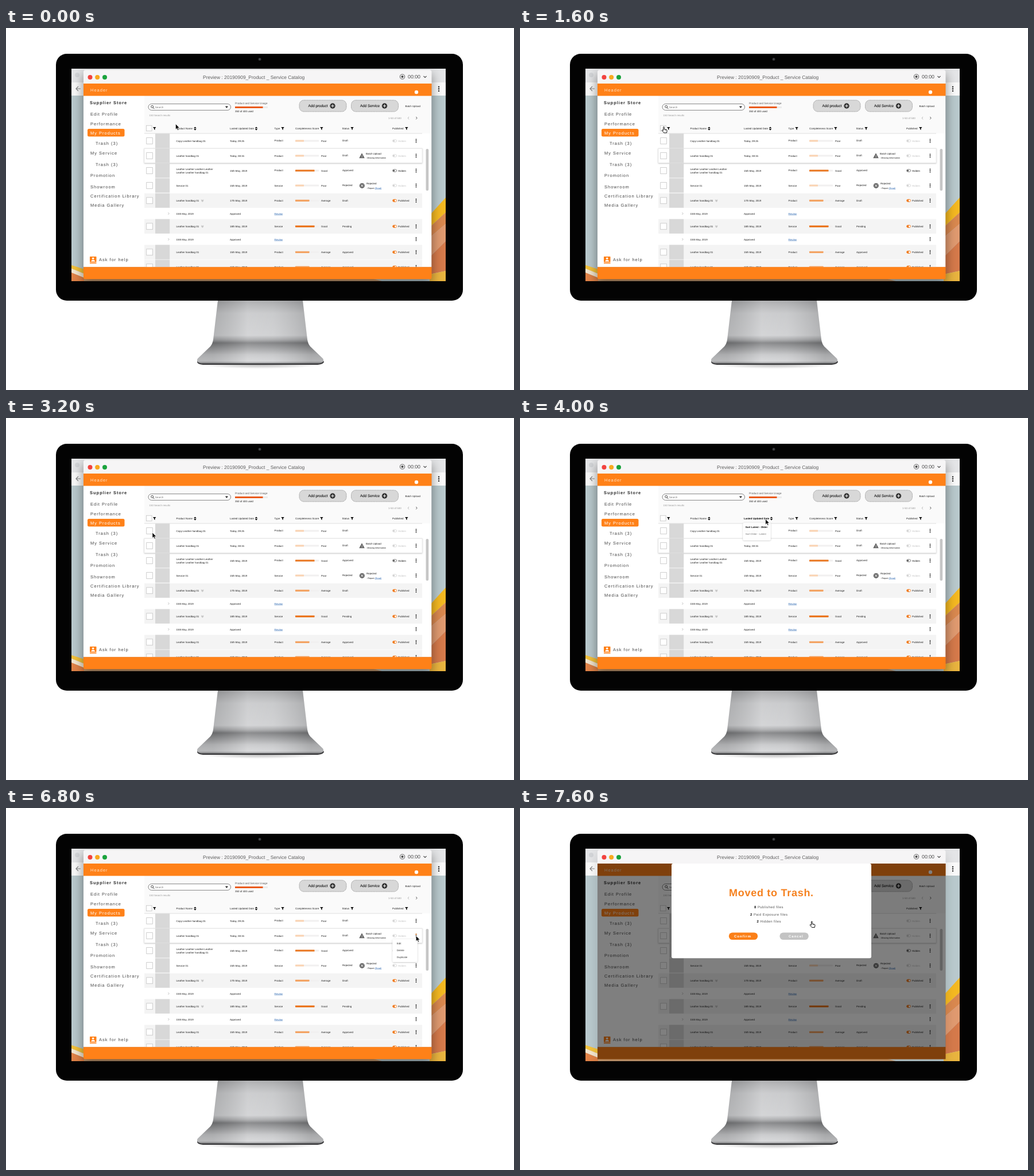
Recreate the animation shown at these times as an HTML page. Size 885 px wide and 632 px high, loop 8000 ms.

```html
<!DOCTYPE html>
<html lang="en">
<head>
<meta charset="utf-8">
<title>Catalog preview</title>
<style>
html, body { margin: 0; width: 100%; height: 100%; overflow: hidden; background: #fff; }
svg { display: block; font-family: "Liberation Sans", Arial, sans-serif; text-rendering: geometricPrecision; }
</style>
</head>
<body>
<svg id="stage" width="885" height="632" viewBox="0 0 885 632"></svg>
<script>
const INK = '#1c1c1c', ORANGE = '#ff8118';

const text = (x, y, s, size = 4.45, fill = INK, extra = '') =>
  `<text x="${x}" y="${y}" font-size="${size}" fill="${fill}" ${extra}>${s}</text>`;
const rect = (x, y, w, h, fill, extra = '') =>
  `<rect x="${x}" y="${y}" width="${w}" height="${h}" fill="${fill}" ${extra}/>`;
const dot = (x, y, r, fill, extra = '') =>
  `<circle cx="${x}" cy="${y}" r="${r}" fill="${fill}" ${extra}/>`;
const path = (d, fill = 'none', extra = '') => `<path d="${d}" fill="${fill}" ${extra}/>`;
const group = (id, body, extra = '') => `<g id="${id}" ${extra}>${body}</g>`;
const line = (color, width = 1) => `stroke="${color}" stroke-width="${width}"`;
const bold = 'font-weight="700"';
const spaced = 'letter-spacing="1"';

const funnel = x => path(`M${x - 2.7} 173h5.4l-2 2.6v2.4l-1.4-.8v-1.6z`, '#000');
const sorter = x => path(`M${x - 2.3} 175l2.3-2.6 2.3 2.6zm0 1.1h4.6l-2.3 2.6z`, '#000');
const kebab = (x, y, r = .95, gap = 2.6) =>
  [-gap, 0, gap].map(d => dot(x, y + d, r, '#222')).join('');
const panel = (x, y, w, h) =>
  rect(x, y, w, h, '#fff', 'rx="2" fill-opacity=".95" filter="url(#soft)"');

function monitor() {
  return rect(87, 45, 709, 431, '#030303', 'rx="19"') +
    dot(442, 54.5, 2.6, '#2c2c2e') + dot(442, 54.5, 1.2, '#4a4d52') +
    `<ellipse cx="443" cy="587" rx="108" ry="8" fill="url(#floor)"/>` +
    path('M333 583Q333 587 343 588H543Q553 587 554 583L552 579H334Z', '#3b3b3d') +
    path('M369 476H517L525 544Q526 551 530 556L552 577Q556 583 546 585.5H340Q330 583 334 577L356 556Q360 551 361 544Z', 'url(#metal)') +
    path('M369 476H517L525 544Q526 551 530 556L552 577Q556 583 546 585.5H340Q330 583 334 577L356 556Q360 551 361 544Z', 'url(#sheen)');
}

function browser() {
  const stripes =
    path('M114 414L136 421V429L114 420Z', '#f3c23c') +
    path('M114 420L136 429V436L114 427Z', '#f4e6cf') +
    path('M114 427L136 436V442H114Z', '#e08348') +
    path('M738 327L766 296V322L738 348Z', '#f5b921') +
    path('M738 348L766 322V342L738 366Z', '#d9884f') +
    path('M738 366L766 342V372L738 400Z', '#e09a70') +
    path('M738 400L766 372V424L738 430Z', '#d57a4b') +
    path('M738 430L766 424V442H738Z', '#e9b43f');
  return rect(114, 71, 652, 371, '#b9c9cd') + stripes +
    path('M136 438H640L655 442H136Z', '#c89a6e') +
    rect(114, 71, 652, 24, '#e4e5e7') + dot(124, 82, 4, '#d3d5d8') +
    rect(114, 95, 652, 23, '#fafafa') +
    path('M130 106H122M126 102L122 106L126 110', 'none', line('#858585', 1.2)) +
    kebab(754, 106.3, 1.2, 3.6) +
    group('shadow', rect(133, 80, 610, 368, '#000', 'filter="url(#blur)"'), 'clip-path="url(#screen)"');
}

function titleBar() {
  return path('M135 97V77Q135 73 139 73H737.5Q741.5 73 741.5 77V97Z', '#f6f5f6') +
    dot(146.5, 86, 4, '#f2433f') + dot(159.2, 86, 4, '#f8a91f') + dot(172, 86, 4, '#1ba33d') +
    text(343, 88.6, 'Preview : 20190909_Product _ Service Catalog', 8.45, '#5e5e5e') +
    dot(690.5, 85, 4.1, 'none', line('#4c4c4c', .9)) + dot(690.5, 85, 2.1, '#4c4c4c') +
    text(700, 88, '00:00', 8.8, '#4c4c4c') +
    path('M727.5 84L730 86.5L732.5 84', 'none', line('#4c4c4c', 1.1));
}

function sidebar() {
  const items = [[147, 153, 'Edit Profile'], [147, 169.5, 'Performance'], [156, 204.3, 'Trash (3)'],
    [147, 221.3, 'My Service'], [156, 241, 'Trash (3)'], [147, 260, 'Promotion'],
    [147, 279.5, 'Showroom'], [147, 295.5, 'Certification Library'], [147, 311.5, 'Media Gallery'],
    [162, 407.2, 'Ask for help']];
  return rect(135, 118, 106, 300, '#fff') +
    text(146, 133.3, 'Supplier Store', 7.5, '#2b2b2b', bold + ' ' + spaced) +
    rect(142, 176, 64.5, 13.5, ORANGE, 'rx="2.5"') +
    text(147, 186.2, 'My Products', 7.5, '#fff', spaced) +
    items.map(([x, y, s]) => text(x, y, s, 7.5, '#484848', spaced)).join('') +
    rect(146, 399, 11.5, 9.8, ORANGE, 'rx=".8"') + rect(146, 409.6, 11.5, 1.6, ORANGE) +
    dot(151.7, 402.3, 1.7, '#fff') + path('M148.4 407.4Q148.8 404.8 151.7 404.8T155 407.4Z', '#fff');
}

function button(x, plusX, label) {
  return rect(x, 126, 82, 20, '#d8d8d8', `rx="8" ${line('#858585', .8)} stroke-dasharray="1.6 1"`) +
    text(x + 15.5, 138.2, label, 6.3, '#222', 'stroke="#222" stroke-width=".15"') +
    dot(plusX, 136, 4.7, '#333') +
    path(`M${plusX - 2.6} 136h5.2M${plusX} 133.4v5.2`, 'none', line('#fff', 1));
}

function toolbar() {
  return rect(241, 118, 500.5, 66, '#fafafa') +
    rect(248, 132.5, 143.5, 11, '#fff', `rx="5.5" ${line('#555', .7)}`) +
    dot(254.7, 137.3, 2, 'none', line('#333', .9)) + path('M256.2 138.9l2.2 2.2', 'none', line('#333', 1)) +
    text(259.8, 139.8, 'Search', 4.6, '#777') + path('M381.8 136.8h5.2l-2.6 2.8z', '#000') +
    text(249.5, 153.8, '150 Search results', 4.4, '#979797') +
    text(399, 132.7, 'Product and Service Usage', 4.65, '#555') +
    rect(399, 137, 57, 3, '#ececec') + rect(399, 137, 48.5, 3, '#ea5a1c') +
    text(399, 146.8, '350 of 400 used', 4.45) +
    button(511, 569, 'Add product') + button(601.5, 659.5, 'Add Service') +
    text(695.5, 137.9, 'Batch Upload', 4.4) +
    text(666, 158.8, '1-50 of 500', 4.5, '#979797') +
    path('M702 155l-1.8 2.2 1.8 2.2', 'none', line('#999', .7)) +
    path('M714.3 155l1.8 2.2-1.8 2.2', 'none', line('#333', .8));
}

function checkbox(y, x = 244.7, size = 10.8) {
  return rect(x, y - size / 2, size, size, '#fff', line('#c4c4c4', .8));
}
const tick = y => path(`M246.5 ${y}l2.8 3 5-6`, 'none', line('#111', 1.5));

const levels = { Poor: [15, '#fbd3b2'], Average: [24.5, '#f3a363'], Good: [33.5, '#ea761f'] };

function score(y, level) {
  const [w, color] = levels[level];
  return rect(504, y - 1.6, 41, 3.2, '#f1f0f0', 'rx=".6"') + rect(504, y - 1.6, w, 3.2, color, 'rx=".6"') +
    text(549, y + 1.8, level);
}

function toggle(y, mode) {
  const on = mode === 'Published';
  const color = on ? '#f17a1c' : mode === 'off' ? '#cfcfcf' : '#555';
  return rect(673.6, y - 2.1, 7, 4.2, on ? color : '#fff', `rx="2.1" ${line(color, .7)}`) +
    dot(on ? 678.6 : 675.6, y, 1.6, on ? '#fff' : color) +
    text(683, y + 1.7, on ? mode : 'Hidden', 4.45, mode === 'off' ? '#c4c4c4' : INK);
}

const badge = y => path(`M340.2 ${y - 2.4}l1 1.2h2l1-1.2v3.2l-2 1.8-2-1.8z`, '#c9c9c9');

// y, name, date, type, level, status, toggle
const rows = [
  [197, 'Copy Leather handbag 01', 'Today, 09:25', 'Product', 'Poor', 'Draft', 'off'],
  [223, 'Leather handbag 01', 'Today, 08:15', 'Product', 'Poor', 'Draft', 'off'],
  [249, '', '15th May, 2019', 'Product', 'Good', 'Approved', 'dark'],
  [275, 'Service 01', '15th May, 2019', 'Service', 'Poor', 'Rejected', 'off'],
  [301.3, 'Leather handbag 01', '17th May, 2019', 'Product', 'Average', 'Draft', 'Published'],
  [346.3, 'Leather handbag 01', '18th May, 2019', 'Service', 'Good', 'Pending', 'Published'],
  [391.3, 'Leather handbag 01', '15th May, 2019', 'Product', 'Average', 'Approved', 'Published'],
  [417.3, 'Leather handbag 01', '15th May, 2019', 'Product', 'Average', 'Approved', 'Published']
];

function row([y, name, date, type, level, status, mode], i) {
  const back = i > 3 ? rect(241, y - 12.7, 484, 25.4, '#f4f4f4') :
    i === 1 ? rect(241, y - 12.5, 484, 25, '#fff', `${line('#e2e2e2', .7)} filter="url(#soft)"`) : '';
  return back + rect(260, y - 12.7, 25.2, 25.2, '#d8d8d8') + checkbox(y) +
    text(296.5, y + 1.8, name) + text(390, y + 1.8, date) +
    text(467.5, y + (i % 2 || i > 3 ? 1.6 : .9), type) + score(y, level) +
    text(586, y + 1.3, status) + toggle(y, mode) + kebab(714.5, y);
}

function subRow(y) {
  return path(`M282.3 ${y - 2}l2 2-2 2`, 'none', line('#aaa', .7)) +
    text(296.5, y + 1.6, '15th May, 2019') + text(390, y + 1.6, 'Approved') +
    text(467.5, y + 1.6, 'Review', 4.45, '#2a66b0', 'text-decoration="underline"');
}

function table() {
  return rect(241, 184, 500.5, 234, '#fff') + rect(241, 183.7, 484, .7, '#cfcfcf') +
    rows.map(row).join('') + subRow(324) + subRow(369) + kebab(714.5, 368.5) +
    text(296.5, 248.2, 'Leather Leather Leather Leather') + text(296.5, 254.2, 'Leather Leather handbag 01') +
    badge(301.3) + badge(346.3) +
    path('M620 218.3l4.8 9h-9.6z', '#666') + text(619.3, 226.2, '!', 5.5, '#fff', bold) +
    text(627, 220.9, 'Batch Upload') + text(627, 227.8, '- Missing Information', 3.75) +
    dot(620.3, 275.3, 4.6, '#707070') + path('M618.5 273.5l3.6 3.6m0-3.6l-3.6 3.6', 'none', line('#fff', 1)) +
    text(628, 273.2, 'Rejected') +
    text(628, 280.6, '- Report <tspan fill="#2a66b0" text-decoration="underline">(Read)</tspan>', 3.75) +
    rect(731.5, 211, 4.7, 73, '#c6c6c6', 'rx="2.3"');
}

function headings() {
  const names = [[467.5, 'Type'], [504, 'Completeness Score'], [585.5, 'Status']];
  return checkbox(175, 244.5, 9.6) + funnel(258.7) + text(673, 177.4, 'Published') + funnel(697.8) +
    group('columns', names.map(([x, s]) => text(x, 177.4, s)).join('') +
      [482, 549.8, 603].map(funnel).join('') +
      group('name', text(296.5, 177.4, 'Product Name') + sorter(329.4)) +
      group('nameBold', text(296.5, 177.4, 'Product Name', 4.45, '#000', bold) + sorter(331.4)) +
      group('date', text(390, 177.4, 'Lasted Updated Date') + sorter(436)) +
      group('dateBold', text(390, 177.4, 'Lasted Updated Date', 4.45, '#000', bold) + sorter(438))) +
    group('checks', tick(175) + rows.slice(0, 7).map(r => tick(r[0])).join('') +
      [[272.7, 'Move to trash'], [315.3, 'Submit'], [347.8, 'Publish'], [381.7, 'Hidden']]
        .map(([x, s]) => text(x, 175.9, s, 4.45, '#333')).join(''));
}

function menus() {
  const sortMenu = (id, x, w, first, second) => group(id, panel(x, 183, w, 30.5) +
    text(x + 4.5, 192, first, 4.4, '#000', bold) + text(x + 4.5, 203.8, second, 4.4, '#777'));
  const picks = [[214, 'Ready to Submit'], [225, 'Published'], [236.2, 'Hidden']];
  return sortMenu('nameMenu', 295.5, 43, 'Sort A - Z', 'Sort Z - A') +
    sortMenu('dateMenu', 388.3, 48.5, 'Sort Latest - Older', 'Sort Older - Latest') +
    group('pickMenu', rect(244, 183, 47, 58, '#fff', 'rx="2" filter="url(#soft)"') +
      text(247, 191.2, '(All)', 4.45, '#000', bold) + text(247, 202, 'None') +
      picks.map(([y, s]) => checkbox(y - 1.7, 247.4, 4) + text(253.5, y, s, 4.45, '#444')).join('')) +
    group('rowMenu', dot(714.5, 220.4, 1, ORANGE) +
      rect(673.3, 229, 43.5, 40, '#fff', 'rx="2" filter="url(#soft)"') +
      ['Edit', 'Delete', 'Duplicate'].map((s, i) => text(680.8, 238.3 + i * 11.8, s, 4.45, '#333')).join(''));
}

function modal() {
  const wide = 'letter-spacing=".43"';
  const counts = [[408, 175, 8, 'Published'], [401, 187.5, 2, 'Paid Exposure'], [412.5, 200.3, 2, 'Hidden']];
  return group('dim', rect(135, 97, 606.5, 341.5, '#000', 'fill-opacity=".5"')) +
    group('modal', rect(264, 97, 348, 165.3, '#fff', 'rx="3"') +
      text(364, 153.5, 'Moved to Trash.', 18, '#f5811f', bold + ' letter-spacing=".72"') +
      counts.map(([x, y, n, s]) =>
        text(x, y, `<tspan font-weight="700" fill="#111">${n}</tspan> ${s} files`, 6, '#555', wide)).join('') +
      rect(363.8, 217.4, 50.4, 12.6, '#fb7f17', 'rx="6.3"') + text(373, 226, 'Confirm', 6, '#fff', bold + ' ' + spaced) +
      rect(452.4, 217.4, 50.4, 12.6, '#c3c3c3', 'rx="6.3"') + text(468, 226, 'Cancel', 6, '#fff', bold + ' ' + spaced));
}

const defs = `<defs>
  <filter id="blur" x="-20%" y="-20%" width="140%" height="140%"><feGaussianBlur stdDeviation="9"/></filter>
  <filter id="soft" x="-20%" y="-20%" width="140%" height="150%">
    <feDropShadow dx="0" dy=".6" stdDeviation="1.1" flood-opacity=".28"/></filter>
  <clipPath id="screen"><rect x="114" y="71" width="652" height="371"/></clipPath>
  <clipPath id="page"><rect x="135" y="97" width="606.5" height="320.5"/></clipPath>
  <linearGradient id="metal" gradientUnits="userSpaceOnUse" x1="0" y1="476" x2="0" y2="586">
    <stop offset="0" stop-color="#a2a3a5"/><stop offset=".2" stop-color="#c4c5c7"/>
    <stop offset=".55" stop-color="#cccdcf"/><stop offset=".62" stop-color="#a5a6a8"/>
    <stop offset=".67" stop-color="#77787a"/><stop offset=".74" stop-color="#939496"/>
    <stop offset=".86" stop-color="#c3c4c6"/><stop offset=".96" stop-color="#d2d3d5"/>
    <stop offset="1" stop-color="#8b8c8e"/></linearGradient>
  <linearGradient id="sheen"><stop offset=".12" stop-color="#000" stop-opacity=".12"/>
    <stop offset=".4" stop-color="#fff" stop-opacity=".16"/><stop offset=".6" stop-color="#fff" stop-opacity=".1"/>
    <stop offset=".9" stop-color="#000" stop-opacity=".14"/></linearGradient>
  <radialGradient id="floor"><stop offset="0" stop-color="#000" stop-opacity=".3"/>
    <stop offset="1" stop-color="#000" stop-opacity="0"/></radialGradient>
</defs>`;

const stage = document.getElementById('stage');
stage.innerHTML = defs + monitor() + browser() + titleBar() +
  `<g clip-path="url(#page)">${sidebar()}${toolbar()}${table()}</g>` +
  rect(135, 97, 606.5, 21.5, ORANGE) + text(147, 111, 'Header', 7.5, '#ffe3c8', spaced) +
  dot(715, 112, 3.2, '#fff') +
  path('M135 417.2H741.5V435.5Q741.5 438.5 738.5 438.5H138Q135 438.5 135 435.5Z', ORANGE) +
  headings() + menus() + modal() +
  group('arrow', path('M0 0V9.4L2.2 7.4L3.7 10.9L5.3 10.2L3.8 6.9H6.7Z', '#000', line('#fff', .6))) +
  group('hand', path('M3 1.3C3 0 4.7 0 4.7 1.3V4.9L8.2 5.6C9.3 5.9 9.7 6.5 9.5 7.4L8.8 11H4L.8 7.2C.2 6.3 1.2 5.6 2 6.2L3 7.1Z',
    '#fff', line('#000', .9)) + path('M6.2 5.3v1.4M7.8 5.6v1.3', 'none', line('#000', .6)));

// start time, cursor, x, y, opacity of what is shown
const steps = [
  [0, 'arrow', 295.5, 167.5, {}],
  [400, 'hand', 306, 178, {}],
  [800, 'arrow', 309, 177.5, { nameMenu: 1 }],
  [1200, 'arrow', 278, 178, { nameMenu: .5 }],
  [1600, 'hand', 246.7, 172, {}],
  [2000, 'hand', 246.7, 172, { checks: 1 }],
  [2400, 'hand', 246.7, 172, { checks: 1, pickMenu: .5 }],
  [2800, 'arrow', 252.7, 174.7, { checks: 1, pickMenu: 1 }],
  [3200, 'arrow', 255, 200, {}],
  [3600, 'hand', 428, 177.5, {}],
  [4000, 'arrow', 427.7, 176.5, { dateMenu: 1 }],
  [4800, 'hand', 433.5, 177.3, {}],
  [5200, 'arrow', 714.3, 223.2, {}],
  [5600, 'arrow', 714.3, 223.2, { rowMenu: 1 }],
  [7200, 'arrow', 688.6, 248, { dim: 1, modal: .87 }],
  [7600, 'hand', 504.5, 197.5, { dim: 1, modal: 1 }]
];
const ids = ['columns', 'name', 'nameBold', 'date', 'dateBold', 'checks', 'nameMenu', 'dateMenu',
  'pickMenu', 'rowMenu', 'dim', 'modal', 'arrow', 'hand', 'shadow'];
const parts = Object.fromEntries(ids.map(id => [id, document.getElementById(id)]));
let current;

function show(step) {
  const [, cursor, x, y, on] = step;
  const shown = {
    columns: on.checks ? 0 : 1,
    name: on.nameMenu ? 0 : 1, nameBold: on.nameMenu ? 1 : 0,
    date: on.dateMenu ? 0 : 1, dateBold: on.dateMenu ? 1 : 0,
    shadow: on.dim ? .12 : .38, [cursor]: 1, ...on
  };
  for (const id of ids) parts[id].setAttribute('opacity', shown[id] || 0);
  parts[cursor].setAttribute('transform', `translate(${x} ${y})`);
}

function tickFrame() {
  const t = performance.now() % 8000;
  const step = steps.findLast(s => s[0] <= t);
  if (step !== current) show(current = step);
  requestAnimationFrame(tickFrame);
}
tickFrame();
</script>
</body>
</html>
```
